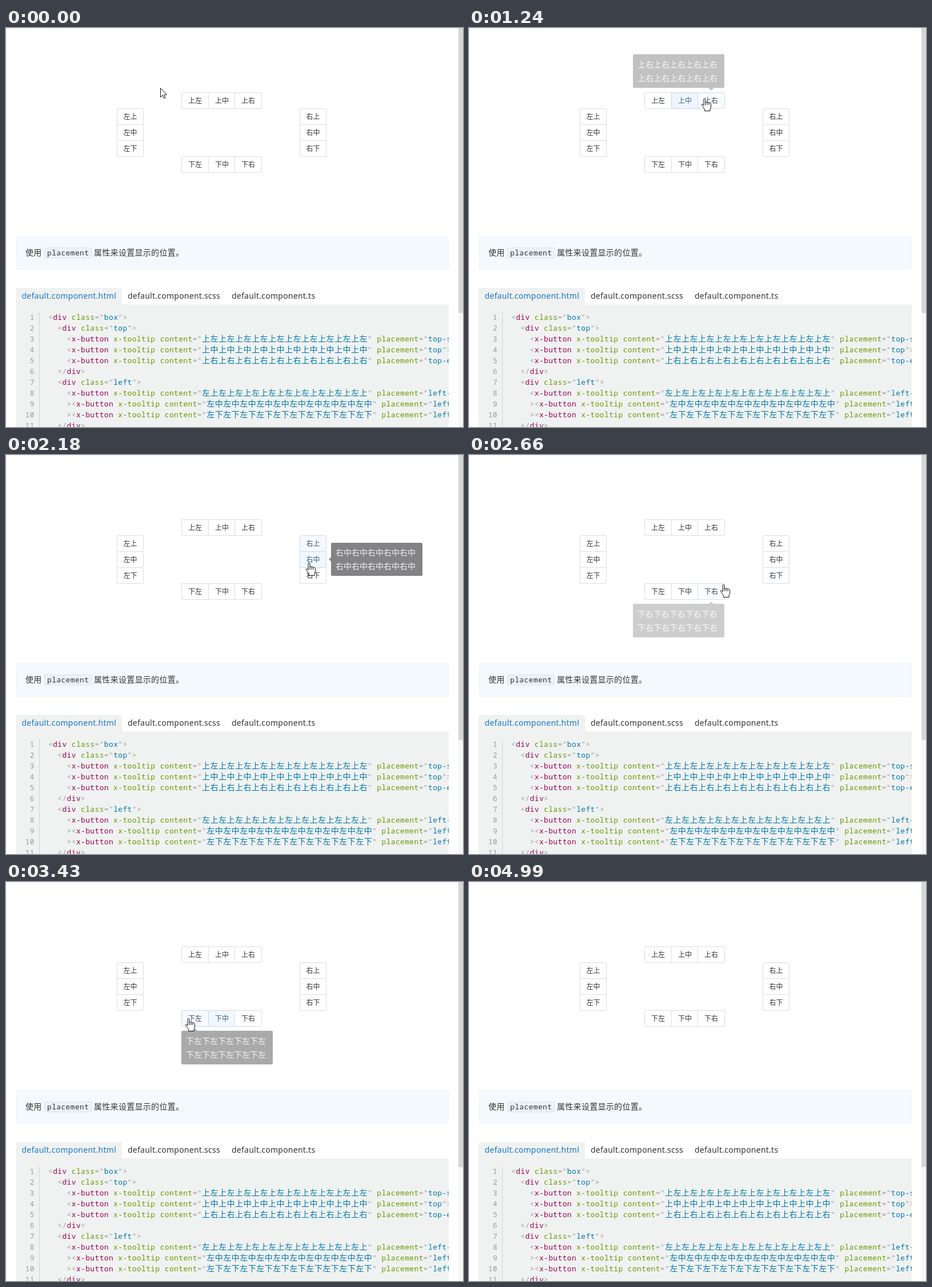
These frames come from a looping animation (800x700 px, 5370 ms). An HTML page:

```html
<!DOCTYPE html>
<html lang="zh-CN">
<head>
<meta charset="utf-8">
<style>
html, body { margin: 0; width: 100%; height: 100%; overflow: hidden; background: #fff; }
body { position: relative; font: 14px/24px "Noto Sans", "Noto Sans CJK SC", "Noto Sans CJK", sans-serif; color: #333; }
body * { box-sizing: border-box; }
body > * { position: absolute; }
#frame { inset: 0 8px 0 0; border: solid #f1f1fb; border-width: 1px 0 0 1px; }
#track { left: 792px; top: 0; width: 8px; height: 700px; background: linear-gradient(#d6d6d6 500px, #f6f6f6 0); }
.btn { border: 1px solid; border-radius: 2px; font-size: 12px; display: flex; align-items: center; justify-content: center; white-space: nowrap; }
#tip { z-index: 2; width: 160px; padding-left: 8px; border-radius: 2px; background: #303133; color: rgba(255,255,255,.88); white-space: pre; display: flex; align-items: center; }
#arrow { position: absolute; width: 8px; height: 8px; margin: -4px; background: #303133; transform: rotate(45deg); }
#info { left: 17px; top: 365px; width: 758px; height: 59px; background: #f4f9fd; border: 1px solid #eef4f9; border-radius: 3px; }
.note { top: 382px; letter-spacing: .3px; white-space: nowrap; }
.mono { font-family: "Noto Sans Mono", "Noto Sans CJK SC", "Noto Sans CJK", monospace; font-size: 12.75px; letter-spacing: .5px; white-space: pre; }
#word { left: 67px; top: 385px; width: 83px; height: 19px; padding-left: 4px; line-height: 17px; background: #eaf2fa; border: 1px solid #dbe5ef; border-radius: 2px; }
.tab { top: 456px; height: 29px; line-height: 27px; letter-spacing: .25px; white-space: nowrap; }
.tab.on { left: 17px; width: 186px; padding-left: 10.5px; background: #f0f2f1; color: #1a78c8; border-radius: 2px 2px 0 0; }
#code { left: 17px; top: 485px; width: 758px; height: 215px; padding-top: 13px; background: #f0f2f1; overflow: hidden; line-height: 19px; color: #999; }
#code div { height: 19px; }
#code b { display: inline-block; width: 33px; margin-right: 24px; font-weight: 400; text-align: right; }
#code::after { content: ""; position: absolute; left: 41px; top: 13px; width: 1px; height: 202px; background: #d0d3d6; }
.tag { color: #905; } .attr { color: #690; } .val { color: #07a; }
.cjk { font-size: 14px; line-height: 0; }
#cursor { z-index: 3; left: 0; top: 0; width: 800px; height: 700px; }
</style>
</head>
<body>
<div id="frame"></div><div id="track"></div>
<div id="info"></div>
<div class="note" style="left:34px">使用</div>
<div id="word" class="mono">placement</div>
<div class="note" style="left:154px">属性来设置显示的位置。</div>
<div class="tab on">default.component.html</div>
<div class="tab" style="left:213px">default.component.scss</div>
<div class="tab" style="left:395px">default.component.ts</div>
<div id="code" class="mono"></div>
<div id="tip"><span></span><div id="arrow"></div></div>
<svg id="cursor"><path id="shape" stroke="#111" stroke-linejoin="round"/></svg>
<script>
const $ = id => document.getElementById(id);
const place = (el, box) => { for (const k in box) el.style[k] = box[k] + 'px'; };

// Code listing
const span = (cls, s) => `<span class="${cls}">${s}</span>`;
const attr = (name, value) => ' ' + span('attr', name) + '="' + span(/[a-z]/.test(value) ? 'val' : 'val cjk', value) + '"';
const open = (cls, indent = '  ') => indent + '&lt;' + span('tag', 'div') + attr('class', cls) + '&gt;';
const close = '  &lt;/' + span('tag', 'div') + '&gt;';
const button = (label, where, start = '', end = '') => `    ${start}&lt;` + span('tag', 'x-button') + ' ' +
  span('attr', 'x-tooltip') + attr('content', label.repeat(10)) + attr('placement', where) + end;
const ends = ['-start', '', '-end'];
$('code').innerHTML = [
  open('box', ''), open('top'),
  ...ends.map((end, i) => button('上' + '左中右'[i], 'top' + end, '', '&gt;')),
  close, open('left'),
  ...ends.map((end, i) => button('左' + '上中下'[i], 'left' + end, i ? '&gt;' : '')),
  close
].map((line, i) => `<div><b>${i + 1}</b>${line}</div>`).join('');

// Buttons, each with the boxes of its tooltip and arrow
const buttons = [];
function addButton(label, box, tip, arrow) {
  const el = document.createElement('div');
  el.className = 'btn';
  el.textContent = label;
  place(el, box);
  document.body.append(el);
  buttons.push({ el, label, box, tip, arrow, visits: [] });
}
for (let i = 0; i < 3; i++) {
  const left = Math.round(307 + 46.5 * i), top = 141 + 28 * i;
  const tipLeft = 307 - 10 * i, tipTop = 141 + 13 * i;
  const row = (side, y, tipY, edge) => addButton(side + '左中右'[i], { left, top: y, width: 48, height: 29 },
    { left: tipLeft, top: tipY, height: 59 }, { left: left + 23.5 - tipLeft, top: edge });
  const column = (side, x, tipX, edge) => addButton(side + '上中下'[i], { left: x, top, width: 47, height: 29 },
    { left: tipX, top: tipTop, height: 58 }, { left: edge, top: top + 14 - tipTop });
  row('上', 113, 46, 57.5);
  row('下', 225, 261, 1.5);
  column('左', 194, 25, 158.5);
  column('右', 514, 569, 1.5);
}

// Key points of the pointer: time, x, y
const path = [
  [70, 270, 105], [200, 330, 119], [380, 341, 120], [710, 341, 120], [1330, 425, 123], [1680, 508, 150],
  [1720, 546, 160], [1950, 546, 162], [2420, 516, 217], [2600, 447, 227], [3050, 440, 230], [3430, 320, 239],
  [3560, 316, 238], [3800, 238, 221], [4030, 209, 198], [4080, 207, 171], [4290, 212, 158], [4720, 566, 567],
  [4990, 766, 712]
];
const shapes = {
  arrow: 'M.5 .5V16.5L4.2 13L6.7 18.5L9 17.5L6.6 12H11.5Z',
  hand: 'M-2 13V2Q-2 .5-.5 .5T1 2V8Q1 6.5 2.5 6.5T4 8.5Q4 7 5.5 7T7 9Q7.5 8 8.7 8T10.5 9.5V15Q10.5 17 9 19V22.5H-.5V20Q-2 17-5.5 12.5Q-6 10.5-4.5 10.5Q-3 10.5-2 13ZM1 8V12M4 8.5V12M7 9V12',
  beam: 'M-3-7.5H-.5M1.5-7.5H4M.5-7V7M-3 7.5H-.5M1.5 7.5H4'
};
const FADE = 270, LOOP = 5370;
const clamp = v => Math.max(0, Math.min(1, v));
const mix = (a, b, k) => `rgb(${a.map((v, i) => Math.round(v + (b[i] - v) * k))})`;

function pointerAt(t) {
  const i = path.findIndex(p => p[0] > t);
  if (i < 1) return path.at(i).slice(1);
  const [t0, x0, y0] = path[i - 1], [t1, x1, y1] = path[i], k = (t - t0) / (t1 - t0);
  return [x0 + (x1 - x0) * k, y0 + (y1 - y0) * k];
}

// Follow the pointer once to learn when it enters and leaves each button
for (let t = 0, last; t < LOOP; t += 2) {
  const [x, y] = pointerAt(t);
  const hit = buttons.find(({ box: b }) => x >= b.left && x < b.left + b.width && y >= b.top && y < b.top + b.height);
  if (hit && hit !== last) hit.visits.push({ enter: t });
  if (hit) hit.visits.at(-1).leave = t + 2;
  last = hit;
}

function draw(t) {
  const tip = $('tip'), shape = $('shape');
  let hovered = false;
  tip.style.opacity = 0;
  for (const b of buttons) {
    let hover = 0;
    for (const { enter, leave } of b.visits) {
      const shown = clamp((t - enter) / FADE);
      hover = Math.max(hover, shown * clamp(1 - (t - leave) / FADE));
      if (t < enter || t >= leave) continue;
      hovered = true;
      tip.style.opacity = shown;
      tip.firstChild.textContent = b.label.repeat(5) + '\n' + b.label.repeat(5);
      place(tip, b.tip);
      place($('arrow'), b.arrow);
    }
    b.el.style.background = mix([255, 255, 255], [232, 241, 253], hover);
    b.el.style.borderColor = mix([218, 221, 232], [188, 213, 243], hover);
    b.el.style.color = mix([51, 51, 51], [66, 120, 185], hover);
    b.el.style.zIndex = hover ? 1 : 0;
  }
  const [x, y] = pointerAt(t).map(Math.round), kind = hovered ? 'hand' : y > 485 ? 'beam' : 'arrow';
  shape.setAttribute('d', shapes[kind]);
  shape.setAttribute('fill', kind === 'beam' ? 'none' : '#fff');
  shape.setAttribute('transform', `translate(${x} ${y})`);
}

function tick() {
  draw(performance.now() % LOOP);
  requestAnimationFrame(tick);
}
tick();
</script>
</body>
</html>
```
